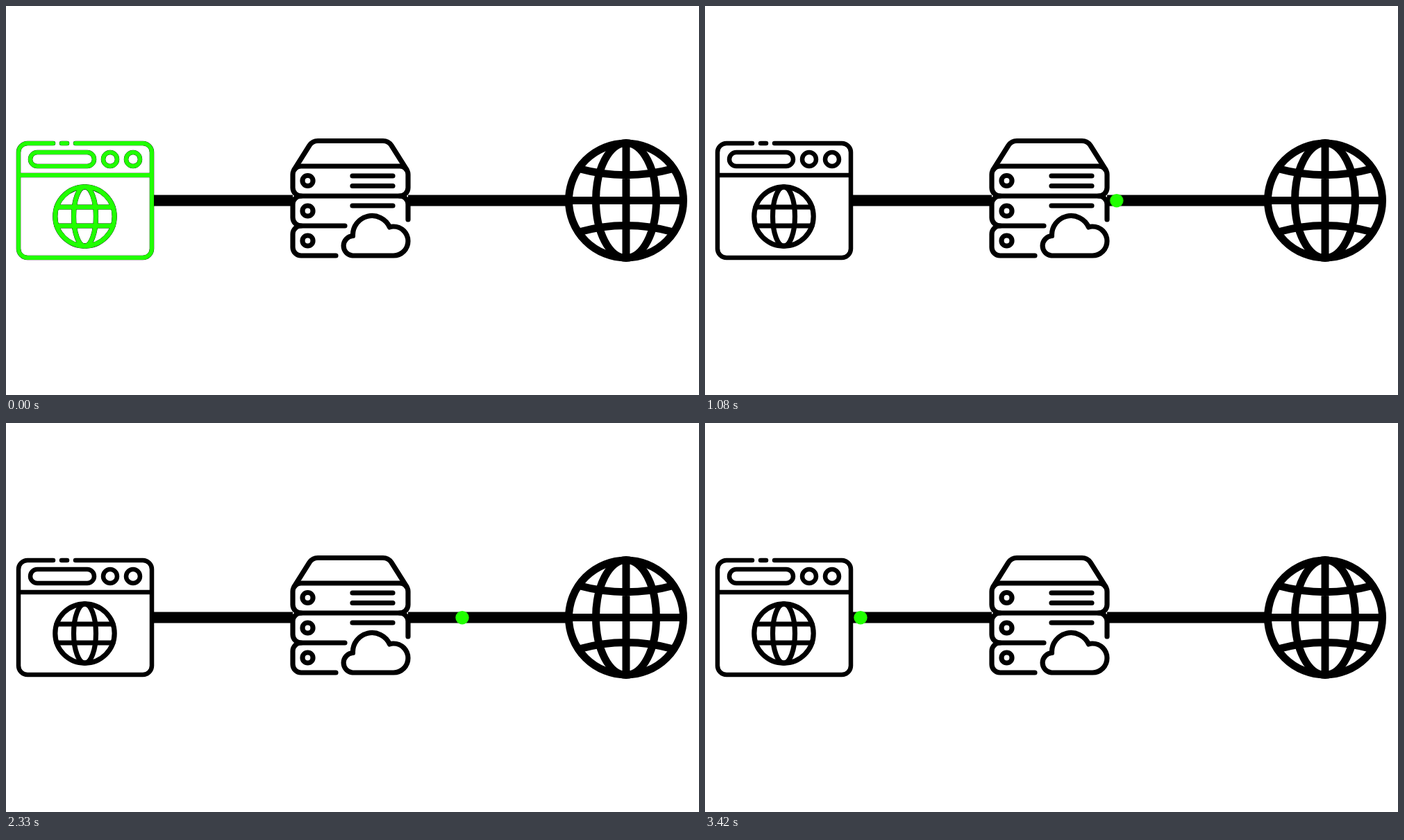
Recreate the animation shown at these times as an HTML page. Size 998 by 561 pixels, loop 3.66 s.

```html
<!DOCTYPE html>
<html lang="en">
<head>
<meta charset="utf-8">
<title>Request path</title>
<style>
  html, body { margin: 0; width: 100%; height: 100%; overflow: hidden; background: #fff; }
  svg { display: block; width: 100%; height: 100%; }
  .icon { --trim: 0px; fill: none; stroke: #000; stroke-linecap: round; stroke-linejoin: round; }
  /* Slightly thinner, so a dark rim of the icon below stays visible. */
  .lit { --trim: .6px; stroke: #21ff00; opacity: 0; }
  #browser { stroke-width: calc(6.5px - var(--trim)); }
  #server, #page { stroke-width: calc(7.2px - var(--trim)); }
  #globe { stroke-width: calc(11px - var(--trim)); stroke-linecap: butt; }
  #dot { fill: #21ff00; opacity: 0; }
</style>
</head>
<body>
<svg viewBox="0 0 998 561">
  <defs>
    <g id="browser">
      <path d="M68 198H31A13 13 0 0 0 18 211V350A13 13 0 0 0 31 363H197A13 13 0 0 0 210 350V211A13 13 0 0 0 197 198H100M80 198H88M18 244H210"/>
      <rect x="35" y="211" width="92" height="20" rx="10"/>
      <circle cx="150" cy="221" r="10"/>
      <circle cx="183" cy="221" r="10"/>
      <g id="page">
        <circle cx="113.5" cy="303.5" r="42.700"/>
        <ellipse cx="113.5" cy="303.5" rx="16" ry="42.700"/>
        <path d="M73 290H154M73 317H154"/>
      </g>
    </g>
    <g id="server">
      <path d="M415 236L437 201Q441.500 194.500 449 194.500H543Q550.500 194.500 555 201L577 236"/>
      <rect x="413" y="231" width="166" height="43" rx="12"/>
      <path d="M425 274A12 12 0 0 0 413 286V305A12 12 0 0 0 425 317H488M567 274A12 12 0 0 1 579 286V308"/>
      <path d="M425 317A12 12 0 0 0 413 329V348A12 12 0 0 0 425 360H475"/>
      <circle cx="434.500" cy="252" r="7.500"/>
      <circle cx="434.500" cy="295.500" r="7.500"/>
      <circle cx="434.500" cy="338.500" r="7.500"/>
      <path d="M499 245H557M499 259.500H557M499 288H557"/>
      <path d="M499.500 331.500A14.300 14.300 0 0 0 499 360H558A21 21 0 0 0 558 318Q555 318 552.500 319A27.700 27.700 0 0 0 499.500 331.500"/>
    </g>
    <g id="globe">
      <circle cx="893" cy="280.500" r="82.500"/>
      <ellipse cx="893" cy="280.500" rx="43.500" ry="83"/>
      <path d="M893 196V365M809 280.500H977M825 234.500Q893 253 961 234.500M825 326Q893 307 961 326"/>
    </g>
  </defs>
  <path d="M211 280.500H413M579 280.500H808" stroke="#000" stroke-width="16"/>
  <use href="#browser" class="icon"/>
  <use href="#server" class="icon"/>
  <use href="#globe" class="icon"/>
  <use href="#browser" class="icon lit" id="browserLit"/>
  <use href="#server" class="icon lit" id="serverLit"/>
  <use href="#globe" class="icon lit" id="globeLit"/>
  <circle id="dot" cy="280.700" r="9.700"/>
</svg>
<script>
  const LOOP = 3660;

  // Plays [time, style] steps, each held until the next one.
  function play(id, steps) {
    const frames = steps.map(([time, style]) => ({ ...style, offset: time / LOOP, easing: 'step-end' }));
    frames.push({ ...steps[steps.length - 1][1], offset: 1 });
    document.getElementById(id).animate(frames, { duration: LOOP, iterations: Infinity });
  }

  const on = { opacity: 1 }, off = { opacity: 0 };
  const at = x => ({ opacity: 1, transform: `translateX(${x}px)` });
  const hidden = { opacity: 0, transform: 'translateX(0px)' };

  play('browserLit', [[0, on], [80, off]]);
  play('serverLit', [[0, off], [1000, on], [1080, off], [2580, on], [2670, off]]);
  play('globeLit', [[0, off], [2000, on], [2080, off]]);
  play('dot', [
    [0, hidden],
    [80, at(224)], [330, at(259)], [580, at(339)], [830, at(401.5)],
    [1080, at(592.8)], [1330, at(657)], [1580, at(738)], [1830, at(795)],
    [2080, at(738)], [2330, at(657)], [2580, hidden],
    [2670, at(401.5)], [2920, at(339)], [3170, at(259)], [3420, at(224)]
  ]);
</script>
</body>
</html>
```
